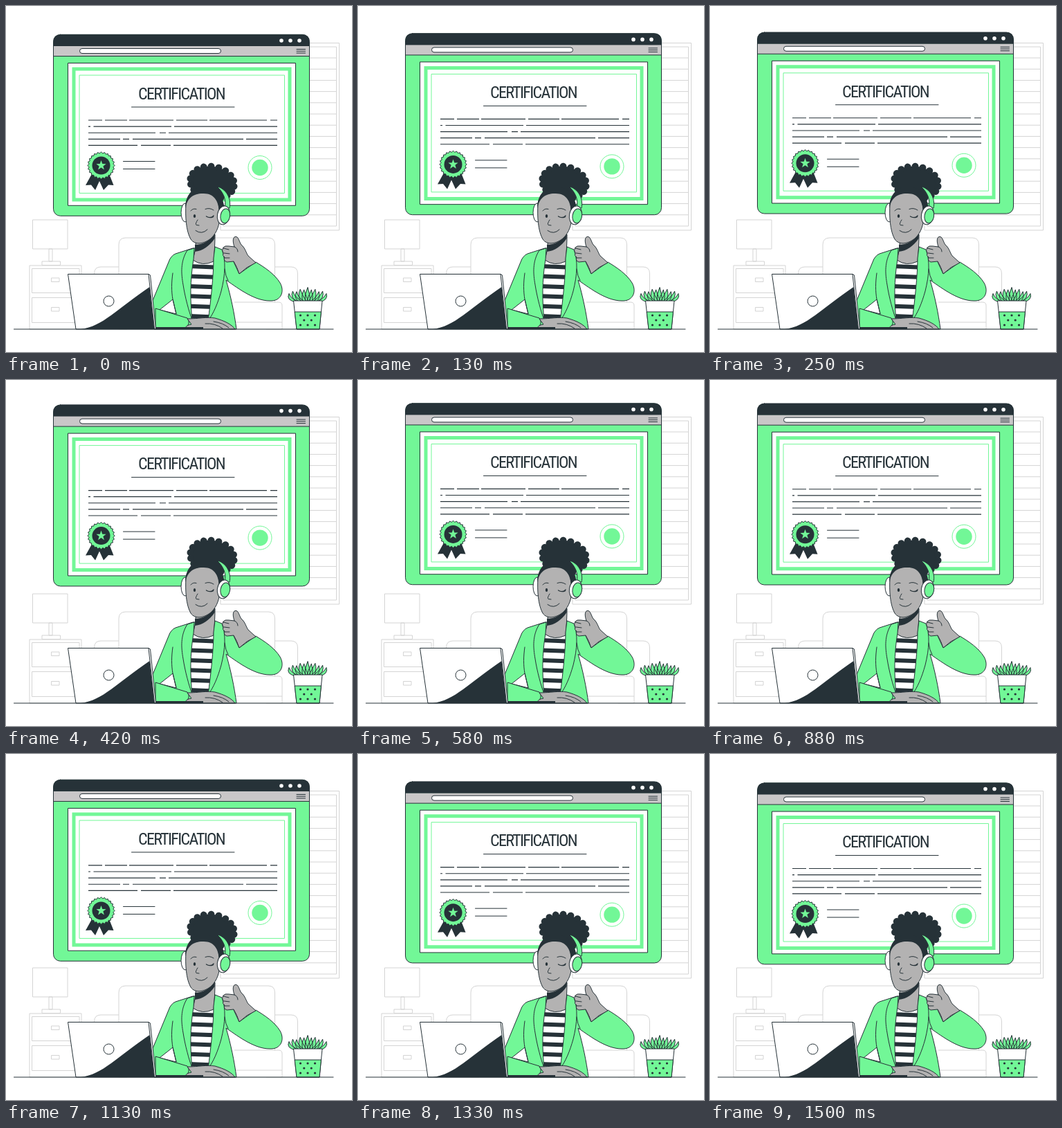
An HTML page that plays this animation: 500x500 px, repeating every 1540 ms.

```html
<!DOCTYPE html>
<html lang="en">
<head>
<meta charset="utf-8">
<title>Certification</title>
<style>
  html, body { margin: 0; width: 100%; height: 100%; overflow: hidden; background: #fff; }
  svg { display: block; width: 100%; height: 100%; }
  .line { fill: none; stroke: #263238; stroke-width: 1; stroke-linecap: round; stroke-linejoin: round; }
  .pale { fill: #fff; stroke: #d4d4d4; stroke-width: 1; }
  .ink { fill: #263238; }
  .green { fill: #72f797; }
  .white { fill: #fff; }
  .skin { fill: #b3b2b2; }
  .frame { fill: none; stroke: #72f797; }
  .edge { stroke: #263238; stroke-width: 1; stroke-linejoin: round; }
  .title { font: 24px "Noto Sans ExtraCondensed", "Roboto Condensed", "Open Sans Condensed", "Noto Sans", sans-serif;
           font-stretch: extra-condensed; letter-spacing: -1.7px; text-anchor: middle; }
</style>
</head>
<body>
<svg viewBox="0 0 500 500">
  <g class="pale">
    <path d="M310 53.5H481.5V324H310Z"/>
    <path d="M314 59H477.5V318H314Z"/>
    <path id="slats"/>
    <path d="M38.500 309H89V351H38.500ZM62 351H67V369H62ZM52 369H78.500V374.500H52Z"/>
    <path d="M34 375H109V467H34ZM37.500 379.500H106V414.500H37.500ZM37.500 421.500H106V457.500H37.500ZM65.500 393H77V398.500H65.500ZM65.500 435.500H77V441H65.500Z"/>
  </g>

  <g id="window">
    <rect class="green" x="68.500" y="41.300" width="370" height="262" rx="10"/>
    <path class="ink" d="M68.500 57.500V51.300Q68.500 41.300 78.500 41.300H428.500Q438.500 41.300 438.500 51.300V57.500Z"/>
    <path fill="#c9c7c8" class="edge" d="M68.500 57.500H438.500V72.500H68.500Z"/>
    <rect class="line" x="68.500" y="41.300" width="370" height="262" rx="10"/>
    <rect class="white edge" x="106.500" y="61.500" width="204" height="7" rx="3.500"/>
    <path class="white" id="buttons"/>
    <path class="line" d="M420 62.500H432.500M420 65.200H432.500M420 68H432.500"/>
    <path class="white edge" d="M89.500 82.500H418.500V288.300H89.500Z"/>
    <path class="frame" stroke-width="5" d="M98 91H410V280H98Z"/>
    <path class="frame" d="M106 100H402.500V270.500H106Z"/>
    <text class="title ink" x="253.500" y="134.800">CERTIFICATION</text>
    <path class="line" d="M181.500 146H330M169.500 224.500H215M169.500 235.500H215"/>
    <path class="line" id="dashes" style="stroke-width:1.15;stroke-linecap:butt"/>
    <path class="ink" d="M125 241L115 259L123 258.500L129 266L135 253L141 266L148 258.500L155.500 259L148 240Z"/>
    <path class="green edge" id="rosette"/>
    <circle class="ink" cx="137.500" cy="230.500" r="13"/>
    <path class="green" id="star"/>
    <circle class="green" cx="367" cy="233.500" r="11.700"/>
    <circle class="frame" cx="367" cy="233.500" r="17"/>
  </g>

  <g class="pale">
    <path d="M127.500 467V387Q127.500 377 137 377H175V467ZM376 467V377H412Q421.500 377 421.500 387V467Z"/>
    <path d="M163 467V345Q163 335 173 335H379Q388.500 335 388.500 345V428H394Q399 428 399 433V467Z"/>
    <path fill="none" d="M330 428H389M330 457H399"/>
  </g>

  <!-- person -->
  <g class="ink" transform="rotate(10 298 255)">
    <ellipse cx="298" cy="255" rx="32" ry="23"/>
    <path id="curls"/>
  </g>
  <ellipse class="white edge" cx="259" cy="298.500" rx="6" ry="13.500"/>
  <path class="green edge" d="M270 350L245 358Q238 361 235 370L211 428L214 467H333C330 444 325 420 318 396C338 410 360 426 381 426C398 427 403 412 396 400C388 387 374 378 361 370L337 387L330 372Q325 358 315 354L302 350Z"/>
  <path class="white edge" d="M241 424L222 439L246 445Z"/>
  <clipPath id="shirt"><path d="M270 362H301L301 395L292 467H269L265 410Z"/></clipPath>
  <g clip-path="url(#shirt)">
    <path class="white" d="M262 360H304V467H262Z"/>
    <path id="stripes" stroke="#263238" stroke-width="6"/>
  </g>
  <path class="skin edge" d="M274 335C275 350 272 359 270 367Q284 377 300 369C301 356 302 346 302 330Z"/>
  <path class="ink" d="M273 345Q290 345 302 329L301.500 336C294 347 284 354 273 355Z"/>
  <path class="green edge" d="M272 350L262 353C252 369 253 386 256 403C259 422 264 440 269 454C266 425 266 396 271 366ZM302 348L312 352C318 368 317 388 311 412C306 430 300 444 292 455C296 425 300 390 300 364Z"/>
  <path class="line" d="M241 386C239 400 239 412 241 424L246 445M316 380Q317 390 321 397"/>
  <path class="green edge" d="M216 437L262 451Q268 459 258 467H216Z"/>
  <path class="skin edge" d="M262 452C278 452 290 449 302 451C316 455 326 460 331 467H258Q260 461 268 460Z"/>
  <path class="line" d="M288 459Q302 458 313 466M300 456Q314 458 322 465"/>

  <path class="skin edge" d="M260 286C259 304 260 325 267 337C273 346 287 344 297 335C305 327 309 316 309 302L306 276Q285 262 268 272Q261 277 260 286Z"/>
  <path class="ink" d="M259 293C259 273 270 261 286 261C304 261 315 275 316 295L308 300C308 281 300 270 284 271C271 271 262 277 259 293Z"/>
  <path class="green edge" d="M305 261C318 264 326 278 323 292L316 292C319 280 314 269 305 261Z"/>
  <g transform="rotate(10 315 302)">
    <ellipse class="white edge" cx="314.500" cy="302.500" rx="9" ry="13.500"/>
    <ellipse class="green edge" cx="317" cy="303" rx="6.800" ry="10.500"/>
  </g>
  <ellipse class="ink" cx="272.500" cy="303.500" rx="1.700" ry="2.500"/>
  <path class="line" d="M267 296Q270 292 275 293.500M288 293.500Q294 291 300 295M277 309Q273 315 275 316.500L279 317M274 324.500Q283 331 291 323"/>
  <path class="line" style="stroke-width:1.400" d="M289.500 304Q294 307 299.500 304.500M298 305L300 303"/>

  <path class="skin edge" d="M330 348C328 342 327 335 331 333.500C336 332 337 341 340 345C346 350 347 357 350 361L361 371Q347 377 337 387Q334 377 329 369L319 370Q314 368 316 363Q312 361 314 357Q311 353 314 349Q316 346 322 347Z"/>
  <path class="line" d="M314 350L322 352M315 357L323 358M316 364L323 364M330 348Q335 350 335 355"/>

  <!-- laptop -->
  <path class="ink" d="M212 464H285V467H212Z"/>
  <path class="white edge" d="M89.500 387.500H206L208.500 389L216.500 467H101Z"/>
  <path class="ink" d="M108 467C140 463 160 438 207.500 406L214.500 467Z"/>
  <path class="line" d="M206 387.500L214.500 467"/>
  <circle class="white edge" cx="148.500" cy="426.500" r="7.500"/>

  <!-- plant -->
  <path class="green edge" id="leaves"/>
  <path class="white edge" d="M415.500 426H457L453 467H420Z"/>
  <path class="green edge" d="M417.200 442H455.400L453 467H420Z"/>
  <path class="ink" id="dots"/>
  <path class="line" d="M11.500 467H473"/>
</svg>
<script>
  const $ = id => document.getElementById(id);
  const range = n => [...Array(n).keys()];
  const draw = (id, parts) => $(id).setAttribute('d', parts.join(''));
  const disc = (x, y, r) => `M${x - r} ${y}a${r} ${r} 0 1 0 ${2 * r} 0a${r} ${r} 0 1 0 ${-2 * r} 0`;

  // Closed ring of points whose radius alternates between two values.
  const ring = (x, y, outer, inner, tips) => [...range(tips * 2).map(i => {
    const a = Math.PI * i / tips - Math.PI / 2, r = i % 2 ? inner : outer;
    return `${i ? 'L' : 'M'}${x + r * Math.cos(a)} ${y + r * Math.sin(a)}`;
  }), 'Z'];

  draw('slats', range(15).map(i => `M314 ${75 + i * 16.2}H477.5`));
  draw('buttons', range(3).map(i => disc(398 + i * 13, 50, 2.8)));
  draw('stripes', range(7).map(i => `M262 ${376 + i * 14.4}L304 ${377.5 + i * 14.4}`));
  draw('rosette', ring(137.5, 230.5, 19.6, 17.6, 24));
  draw('star', ring(137.5, 230.5, 7.5, 3, 5));

  const rows = [
    [119, 139, 143, 175, 178, 242, 246, 291, 294, 377, 382, 392],
    [119, 122, 126.5, 239, 243, 392],
    [119, 216, 222, 231, 235, 392],
    [119, 165, 169, 178, 183, 343, 347, 392],
    [119, 190, 195, 238, 242, 392]
  ];
  draw('dashes', rows.flatMap((row, r) =>
    row.map((x, i) => i % 2 ? `H${x}` : `M${x} ${165 + r * 9.1}`)));

  draw('curls', range(18).map(i => {
    const a = i * Math.PI / 9;
    return disc(298 + 32 * Math.cos(a), 255 + 23 * Math.sin(a), 5);
  }));

  draw('leaves', range(11).map(i => {
    const s = i - 5, x = 436 + s * 2.4, tipX = 436 + s * 5.4;
    const tipY = 406.5 + Math.abs(s) * 1.4 + (i % 2 ? 0 : 2);
    return `M${x - 4} 428Q${tipX - 5} ${tipY + 10} ${tipX} ${tipY}Q${tipX + 3} ${tipY + 10} ${x + 4} 428Z`;
  }));
  draw('dots', range(3).flatMap(r => range(3 - r % 2).map(i =>
    disc(425.5 + i * 10.5 + r % 2 * 5.25, 447 + r * 7, 1.6))));

  // The window bobs at constant speed: 10 px up and back in one loop of 37 steps.
  const LOOP = 1540, STEPS = 37, STEP = 1000 / 24, LEAD = 1.25;
  const start = performance.now();
  function tick(now) {
    const t = Math.max(0, now - start) % LOOP;
    const step = Math.min(STEPS - 1, Math.floor((t + 5) / STEP));
    const phase = (step + LEAD) % STEPS;
    const away = Math.min(phase, STEPS - phase);
    $('window').setAttribute('transform', `translate(0 ${(LEAD - away) * 20 / STEPS})`);
    requestAnimationFrame(tick);
  }
  tick(start);
</script>
</body>
</html>
```
